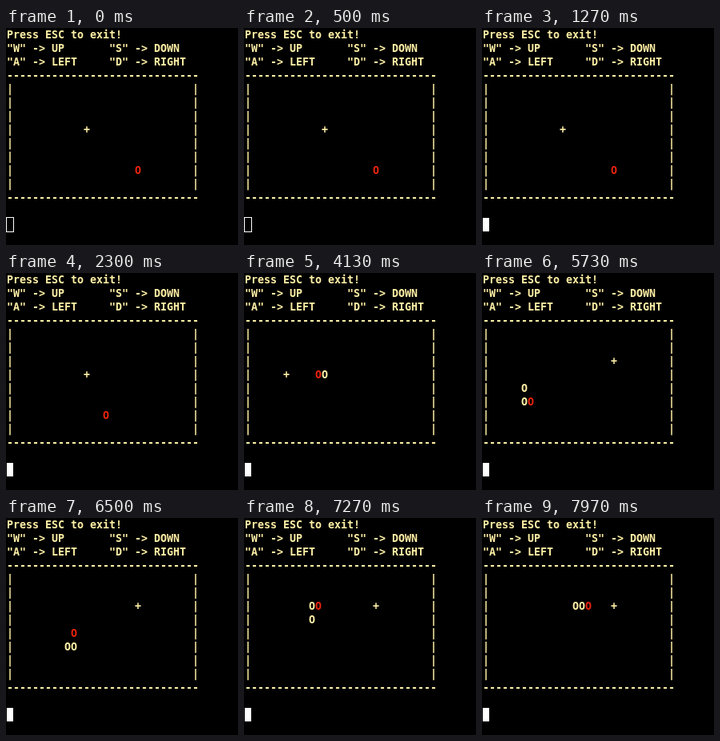
These frames come from a looping animation (290 px wide and 272 px high, 8000 ms). An HTML page with a canvas:

```html
<!DOCTYPE html>
<html lang="en">
<head>
<meta charset="utf-8">
<title>Terminal snake</title>
<style>
  html, body { margin: 0; width: 100%; height: 100%; overflow: hidden; background: #000; }
  canvas { display: block; }
</style>
</head>
<body>
<canvas id="stage" width="290" height="272"></canvas>
<script>
const ctx = document.getElementById("stage").getContext("2d");

const LOOP = 8000;
const CELL_W = 8, CELL_H = 17, LEFT = 1, BASELINE = 13;
const COLS = 30, TOP_ROW = 3, BOTTOM_ROW = 12, CURSOR_ROW = 14;
const TEXT = "#fff0a5", HEAD = "#e8220c", CURSOR = "#fff";
const FOCUS_AT = 1170;

const HELP = [
  "Press ESC to exit!",
  '"W" -> UP       "S" -> DOWN',
  '"A" -> LEFT     "D" -> RIGHT'
];

// Each run: direction, then the times of its steps
const RUNS = [
  ["A", 1430, 1630, 1930, 2100, 2300, 2700, 2900],
  ["W", 3170, 3400, 3600],
  ["A", 3820, 4030, 4230, 4430, 4650, 4870, 5070],
  ["S", 5270, 5470],
  ["D", 5680, 5880, 6090, 6270],
  ["W", 6500, 6700, 6900],
  ["D", 7130, 7330, 7530, 7600, 7770, 7970]
];
const STEP = { W: [0, -1], A: [-1, 0], S: [0, 1], D: [1, 0] };

const FOOD = [
  { at: 0, col: 12, row: 7 },
  { at: 3820, col: 6, row: 7 },
  { at: 5070, col: 20, row: 6 }
];

const path = [{ at: 0, col: 20, row: 10 }];
for (const [key, ...times] of RUNS) {
  const [dx, dy] = STEP[key];
  for (const at of times) {
    const { col, row } = path[path.length - 1];
    path.push({ at, col: col + dx, row: row + dy });
  }
}

function print(text, col, row, color = TEXT) {
  ctx.fillStyle = color;
  [...text].forEach((ch, i) =>
    ctx.fillText(ch, LEFT + (col + i) * CELL_W, row * CELL_H + BASELINE));
}

function drawBoard() {
  HELP.forEach((line, row) => print(line, 0, row));
  const edge = "-".repeat(COLS);
  print(edge, 0, TOP_ROW);
  print(edge, 0, BOTTOM_ROW);
  for (let row = TOP_ROW + 1; row < BOTTOM_ROW; row++) {
    print("|", 0, row);
    print("|", COLS - 1, row);
  }
}

function drawCursor(focused) {
  const y = CURSOR_ROW * CELL_H;
  if (focused) {
    ctx.fillStyle = CURSOR;
    ctx.fillRect(LEFT, y, CELL_W, CELL_H);
  } else {
    ctx.strokeStyle = CURSOR;
    ctx.lineWidth = 1;
    ctx.strokeRect(LEFT - 0.5, y - 0.5, CELL_W + 1, CELL_H + 1);
  }
}

function draw(t) {
  const past = item => item.at <= t;
  ctx.fillStyle = "#000";
  ctx.fillRect(0, 0, 290, 272);
  ctx.font = 'bold 13.33px "DejaVu Sans Mono", monospace';
  drawBoard();

  // The snake is one cell longer for every meal
  const foods = FOOD.filter(past);
  const food = foods[foods.length - 1];
  print("+", food.col, food.row);
  const snake = path.filter(past).slice(-foods.length).reverse();
  snake.forEach(({ col, row }, i) => print("O", col, row, i ? TEXT : HEAD));

  drawCursor(t >= FOCUS_AT);
}

const start = performance.now();
function tick() {
  draw((performance.now() - start) % LOOP);
  requestAnimationFrame(tick);
}
tick();
</script>
</body>
</html>
```
